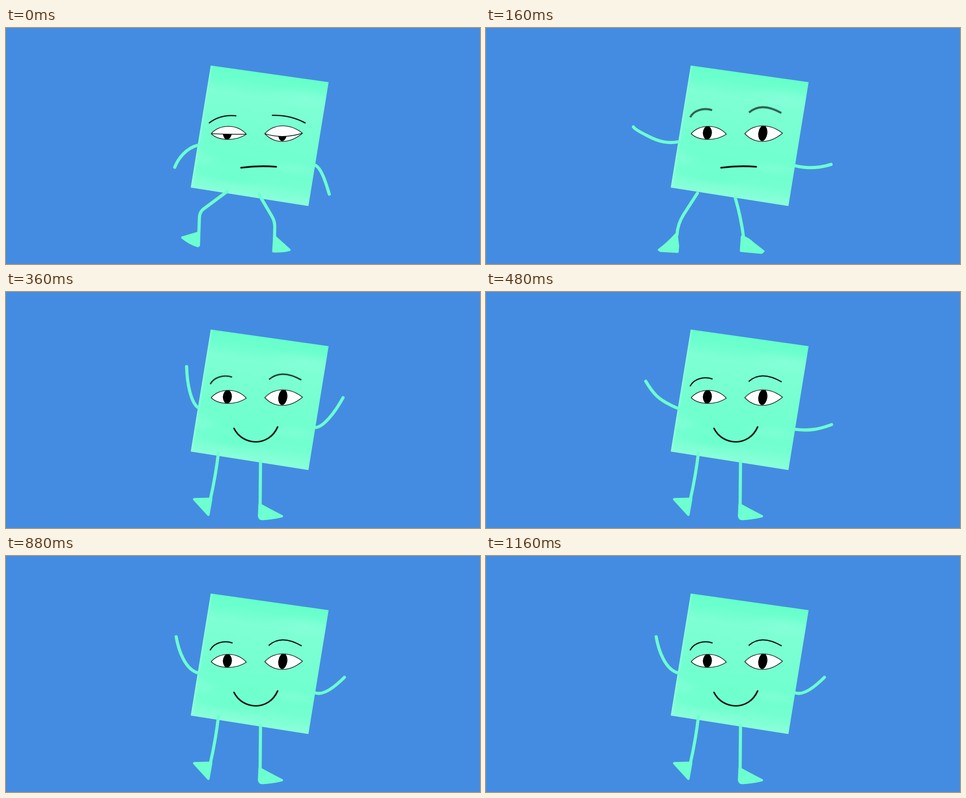
Animation, 1000 px wide and 500 px high, one loop 1200 ms. Source, as an HTML page with a canvas:

```html
<!DOCTYPE html>
<html lang="en">
<head>
<meta charset="utf-8">
<title>Waving note</title>
<style>
  html, body { margin: 0; width: 100%; height: 100%; overflow: hidden; background: #448ce1; }
  canvas { display: block; width: 1000px; height: 500px; }
</style>
</head>
<body>
<canvas id="stage" width="1000" height="500"></canvas>
<script>
const ctx = document.getElementById('stage').getContext('2d');
const LOOP = 1200, STEP = 40;
const MINT = '#6dffcf', INK = '#07130f';

const stepLegs = {
  lines: 'M448 341Q443 386 431 440M537 359L536 462',
  feet: 'M397 439L433 438L427 472ZM535 450Q560 464 582 475Q560 480 541 481Q533 481 534 471Z'
};

// Each pose holds until the next one starts.
const poses = [
  { at: 0,
    arms: 'M356 295C363 277 380 254 406 248M653 291C665 297 674 325 682 352',
    lines: 'M467 346L416 384Q408 391 408 402L406 460M534 353L561 399Q567 409 567 421L566 470',
    feet: 'M372 444L406 434L405 462Q388 457 372 444ZM566 441L598 470Q582 474 564 473Z' },
  { at: 80,
    arms: 'M311 209.5Q314 215 340 228C366 242 385 245 406 241M653 292Q690 301 728 289',
    lines: 'M446 350L417 395Q404 416 403 438M526 360Q538 402 543 441',
    feet: 'M402 436L405 462L404 474L368 472L365 470Q383 457 402 436ZM540 442Q553 446 562 455L585 473L581 476L538 472Z' },
  { at: 240,
    arms: 'M381 158C382 195 390 232 404 244M654 287C670 285 693 257 711 224',
    ...stepLegs },
  { at: 400,
    arms: 'M337 189C352 214 362 229 406 247M653 291C685 295 705 290 729 281',
    ...stepLegs },
  { at: 600,
    arms: 'M359 171C364 200 378 241 406 248M653 290C670 296 695 276 714 257',
    ...stepLegs }
].map(p => ({ ...p, arms: new Path2D(p.arms), lines: new Path2D(p.lines), feet: new Path2D(p.feet) }));

const sheet = new Path2D('M432 79.6L680.6 114.7L638 377.2L389.8 338Z');
const mouth = {
  flat: new Path2D('M496 296Q534 291 570 294'),
  smile: new Path2D('M481 289C500 327 555 328 573 286')
};
const brows = {
  tired: new Path2D('M429 201Q452 183 485 186M562 185Q600 184 631 201'),
  open: new Path2D('M431 199C438 185 458 178 477 184M555 189C572 174 595 174 623 190')
};
const eyes = [
  { shape: new Path2D('M433 224C450 203 488 203 507 225C486 239.5 449 240 433 224Z'),
    lid: 'M433 224Q468 225.5 507 225', over: 'L507 200L433 200Z',
    x: 467, y: 222, rx: 9.5, ry: 14, tilt: 0.06 },
  { shape: new Path2D('M546 224C565 202 600 202 625.5 223C598 246 567 246 546 224Z'),
    lid: 'M546 224Q583 236 625 223', over: 'L625 200L546 200Z',
    x: 584, y: 223, rx: 9.5, ry: 16.5, tilt: 0.14 }
];

function line(path, width, color) {
  ctx.lineWidth = width;
  ctx.strokeStyle = color;
  ctx.stroke(path);
}

function glow(x, y, rx, ry, color) {
  ctx.save();
  ctx.translate(x, y);
  ctx.rotate(0.12);
  ctx.scale(rx, ry);
  const g = ctx.createRadialGradient(0, 0, 0, 0, 0, 1);
  g.addColorStop(0, `rgba(${color},.6)`);
  g.addColorStop(1, `rgba(${color},0)`);
  ctx.fillStyle = g;
  ctx.fillRect(-1, -1, 2, 2);
  ctx.restore();
}

function drawSheet() {
  const g = ctx.createLinearGradient(556, 97, 517, 358);
  [[0, '#66ffca'], [0.08, '#6cffcd'], [0.2, '#7effd4'], [0.34, '#7affd2'], [0.55, '#74ffd0'],
   [0.74, '#6effcd'], [0.88, '#76ffd1'], [1, '#8affd9']].forEach(s => g.addColorStop(...s));
  ctx.fillStyle = g;
  ctx.fill(sheet);
  ctx.save();
  ctx.clip(sheet);
  glow(635, 150, 90, 24, '142,255,220');
  glow(410, 275, 45, 22, '138,255,218');
  glow(605, 298, 75, 18, '136,255,216');
  glow(480, 315, 80, 20, '102,255,202');
  const edge = ctx.createLinearGradient(411, 209, 416, 209.8);
  edge.addColorStop(0, 'rgba(160,255,226,.7)');
  edge.addColorStop(1, 'rgba(160,255,226,0)');
  ctx.fillStyle = edge;
  ctx.fill(sheet);
  ctx.restore();
}

function drawEye(eye, sleepy) {
  ctx.fillStyle = '#fff';
  ctx.fill(eye.shape);
  ctx.save();
  ctx.clip(eye.shape);
  ctx.beginPath();
  ctx.ellipse(eye.x, eye.y, eye.rx, eye.ry, eye.tilt, 0, Math.PI * 2);
  ctx.fillStyle = '#000';
  ctx.fill();
  if (sleepy) {
    ctx.fillStyle = '#fff';
    ctx.fill(new Path2D(eye.lid + eye.over));
    line(new Path2D(eye.lid), 1.5, INK);
  }
  ctx.restore();
  line(eye.shape, 1.4, INK);
}

const mix = (a, b, k) => a + (b - a) * Math.max(0, Math.min(1, k));

// Raised brows sink slowly, then drop to rest while sharpening.
function drawBrows(t) {
  const drop = t < 280 ? mix(-10, -7.5, (t - 160) / 120) : mix(-7.5, 0, (t - 280) / 160);
  const sharp = mix(0, 1, (t - 160) / 280);
  ctx.save();
  ctx.translate(0, drop);
  if (sharp < 1) {
    ctx.lineCap = 'butt';
    ctx.globalAlpha = mix(0.45, 0, sharp);
    line(brows.open, 4.8, INK);
  }
  ctx.globalAlpha = mix(0.4, 1, sharp);
  line(brows.open, mix(3.2, 2.5, sharp), INK);
  ctx.restore();
}

function draw(t) {
  const pose = poses.filter(p => p.at <= t).pop();
  const sleepy = pose === poses[0];
  const happy = t >= poses[2].at;

  ctx.fillStyle = '#448ce1';
  ctx.fillRect(0, 0, 1000, 500);
  ctx.lineCap = ctx.lineJoin = 'round';

  drawSheet();
  line(pose.arms, 6.6, MINT);
  line(pose.lines, 6.6, MINT);
  ctx.fillStyle = MINT;
  ctx.fill(pose.feet);
  line(pose.feet, 5, MINT);

  eyes.forEach(e => drawEye(e, sleepy));
  if (sleepy) line(brows.tired, 2.6, INK);
  else drawBrows(t);
  if (happy) line(mouth.smile, 3.2, INK);
  else line(mouth.flat, 3.6, INK);
}

const start = performance.now();
function tick() {
  const t = (performance.now() - start) % LOOP;
  draw(Math.floor(t / STEP) * STEP);
  requestAnimationFrame(tick);
}
tick();
</script>
</body>
</html>
```
